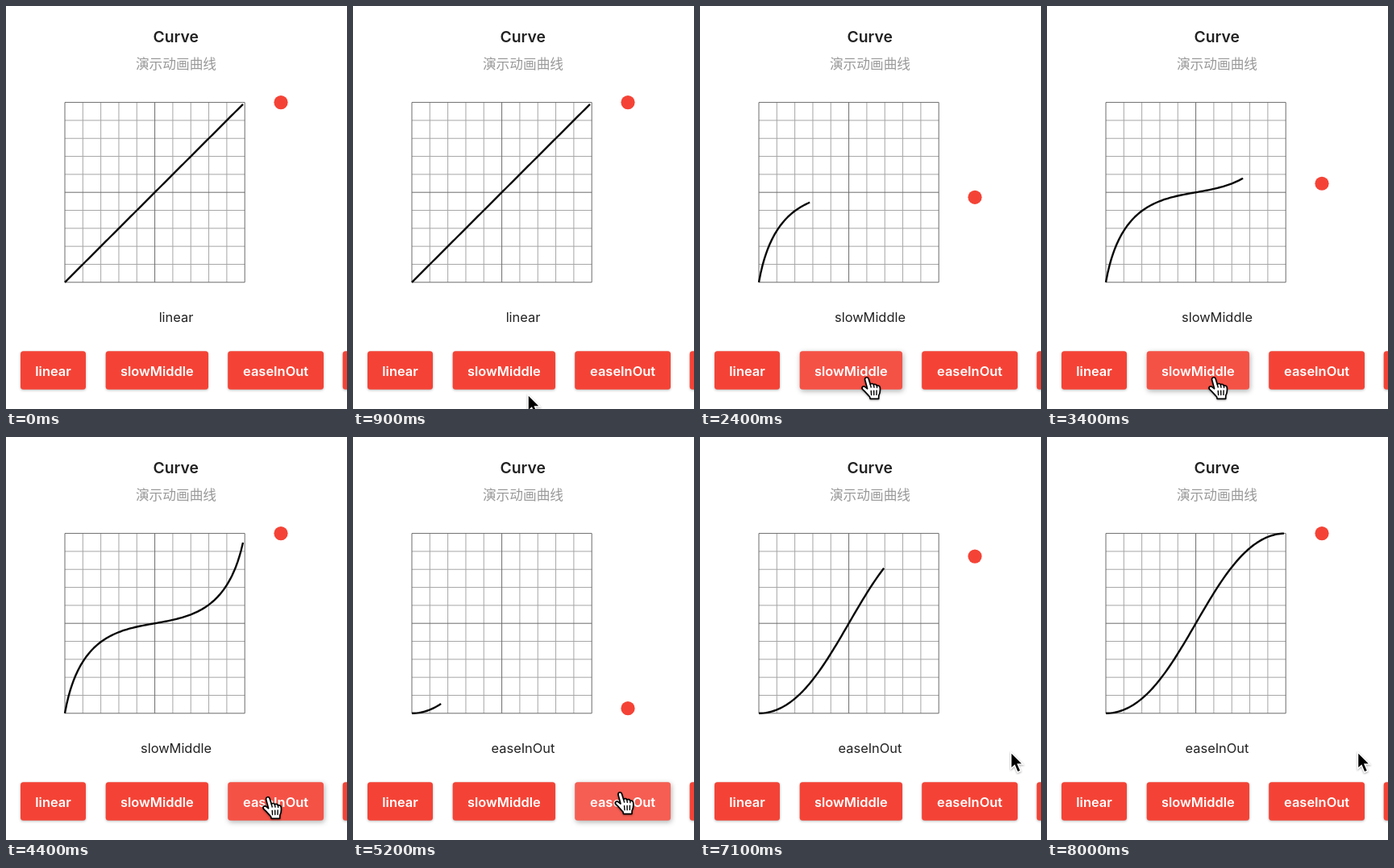
Write an HTML page that moves like this. It is 423 px wide and 500 px high and loops after 8100 ms.

```html
<!DOCTYPE html>
<html lang="zh">
<head>
<meta charset="utf-8">
<title>Curve</title>
<style>
  html, body { margin: 0; width: 100%; height: 100%; overflow: hidden; background: #fff; }
  svg { display: block; }
  text { font-family: Inter, Roboto, sans-serif; text-anchor: middle; fill: #222; }
  .title { font-size: 19.3px; font-weight: 600; }
  .subtitle { font-family: "Noto Sans CJK SC", "Noto Sans CJK", sans-serif; font-size: 16.7px; fill: #999; }
  .label { font-size: 16.4px; }
  .button text { font-size: 16.4px; font-weight: 600; fill: #fff; }
  .button .face { fill: #f44336; filter: drop-shadow(0 1.5px 1.5px rgba(0, 0, 0, .28)); }
  .button.hover .face { filter: drop-shadow(1px 2px 3px rgba(0, 0, 0, .32)); }
  .button .glow { fill: #fff; opacity: 0; }
  .button.hover .glow { opacity: .08; }
  .cursor { filter: drop-shadow(0 1px 1px rgba(0, 0, 0, .35)); }
</style>
</head>
<body>
<svg id="stage" width="423" height="500" viewBox="0 0 423 500">
  <text class="title" x="210.7" y="44.6">Curve</text>
  <text class="subtitle" x="211" y="77.6">演示动画曲线</text>
  <g id="grid" fill="none"></g>
  <path id="curve" fill="none" stroke="#080808" stroke-width="2.4" stroke-linejoin="round"/>
  <circle id="ball" cx="341" r="8.6" fill="#f44336"/>
  <text id="label" class="label" x="211" y="392.4"></text>
  <g id="buttons"></g>
  <g id="arrow" class="cursor">
    <path d="M0 0V20.5L4.6 16.4L8.2 25L12.2 23.3L8.6 15H15Z" fill="#000" stroke="#fff" stroke-width="1.5"/>
  </g>
  <g id="hand" class="cursor" stroke="#000" stroke-width="1.7" stroke-linejoin="round" stroke-linecap="round">
    <path fill="#fff" d="M-2.4 2.6C-2.8-.8 1.3-1.3 2.2 1.8L4.3 8.6C5.2 7 7.8 7.2 8.4 9C9.7 7.8 12 8.4 12.4 10.2C14 9.4 16.2 10.4 16.3 12.6C16.8 17 16.4 19.4 14.8 22.2L14.6 26.4H4.2L3.6 24C.6 20.8-1.4 18-5 14.8C-7.4 12.4-4.8 9.8-2.2 11.6L.6 13.8Z"/>
    <path fill="none" stroke-width="1.4" d="M5.2 16.4L5.6 21.6M8.7 16.2L8.8 21.6M12.1 16L12 21.4M4.3 8.6L5.2 12M8.4 9L9 12.2M12.4 10.2L12.6 12.6"/>
  </g>
</svg>
<script>
const LOOP = 8100, STEP = 100, DURATION = 3000;
const LEFT = 73, TOP = 119.6, SIZE = 223.2, BOTTOM = TOP + SIZE;
const $ = id => document.getElementById(id);

function make(tag, attrs, parent, text = '') {
  const node = document.createElementNS('http://www.w3.org/2000/svg', tag);
  for (const key in attrs) node.setAttribute(key, attrs[key]);
  node.textContent = text;
  return parent.appendChild(node);
}

// Eased value of cubic-bezier(x1, y1, x2, y2) at t.
function cubic(x1, y1, x2, y2) {
  const at = (a, b, s) => 3 * (1 - s) ** 2 * s * a + 3 * (1 - s) * s * s * b + s ** 3;
  return t => {
    let low = 0, high = 1;
    for (let i = 0; i < 30; i++) {
      const mid = (low + high) / 2;
      if (at(x1, x2, mid) < t) low = mid; else high = mid;
    }
    return at(y1, y2, (low + high) / 2);
  };
}

const runs = [
  { name: 'linear', start: -DURATION, ease: t => t },
  { name: 'slowMiddle', start: 1298, ease: cubic(.15, .85, .85, .15) },
  { name: 'easeInOut', start: 4846, ease: cubic(.42, 0, .58, 1) }
];

for (const run of runs) {
  const points = Array.from({ length: 100 }, (_, i) =>
    `${(LEFT + SIZE * i / 100).toFixed(2)} ${(BOTTOM - SIZE * run.ease(i / 100)).toFixed(2)}`);
  run.path = 'M' + points.join('L');
}

for (const strong of [false, true]) {
  for (let i = 0; i <= 10; i++) {
    if ((i % 5 === 0) !== strong) continue;
    const offset = SIZE * i / 10;
    make('path', {
      d: `M${LEFT + offset} ${TOP}v${SIZE}M${LEFT} ${TOP + offset}h${SIZE}`,
      stroke: strong ? '#6c6c6c' : '#a6a6a6', 'stroke-width': 1
    }, $('grid'));
  }
}

const buttons = [[18, 81, 'linear'], [123.7, 127.3, 'slowMiddle'], [275.2, 118.8, 'easeInOut'], [417.7, 100, '']]
  .map(([x, width, name], i) => {
    const group = make('g', { class: 'button' }, $('buttons'));
    const box = { x, y: 428.2, width, height: 47.6, rx: 3.5 };
    make('rect', { ...box, class: 'face' }, group);
    make('rect', { ...box, class: 'glow' }, group);
    make('rect', box, make('clipPath', { id: 'clip' + i }, group));
    const splash = make('circle', { fill: '#fff', 'clip-path': `url(#clip${i})`, opacity: 0 }, group);
    make('text', { x: x + width / 2, y: 458.7 }, group, name);
    return { x, width, name, group, splash };
  });

// Pointer hotspot: time, x, y
const pointerKeys = [
  [700, 226, 503], [1100, 208, 461], [1600, 208, 461], [1900, 207, 461],
  [3700, 207, 461], [4200, 325, 447], [5100, 325, 447], [5600, 386, 391], [LOOP, 385.5, 391]
];

function pointerAt(time) {
  const next = pointerKeys.findIndex(key => key[0] > time);
  if (next < 1) return null;
  const [t0, x0, y0] = pointerKeys[next - 1], [t1, x1, y1] = pointerKeys[next];
  const u = (time - t0) / (t1 - t0), k = u * u * (3 - 2 * u);
  return { x: x0 + (x1 - x0) * k, y: y0 + (y1 - y0) * k };
}

const clamp = v => Math.max(0, Math.min(1, v));

function drawButton(button, time, pointer) {
  const hover = !!pointer && pointer.y > 428 && pointer.y < 476 &&
    pointer.x > button.x && pointer.x < button.x + button.width;
  button.group.classList.toggle('hover', hover);

  const run = runs.find(r => r.name === button.name);
  const age = run ? time - run.start + 100 : -1;
  const active = age >= 0 && age < 700;
  button.splash.setAttribute('opacity', active ? .1 * clamp((700 - age) / 350) : 0);
  if (active) {
    const press = pointerAt(run.start);
    button.splash.setAttribute('cx', press.x);
    button.splash.setAttribute('cy', press.y);
    button.splash.setAttribute('r', 10 + 110 * clamp(age / 300));
  }
  return hover;
}

function drawPointer(id, pointer, visible) {
  $(id).setAttribute('visibility', visible ? 'visible' : 'hidden');
  if (visible) $(id).setAttribute('transform', `translate(${pointer.x} ${pointer.y})`);
}

function draw(time) {
  const run = runs.filter(r => r.start <= time).pop();
  const progress = clamp((time - run.start) / DURATION);
  const curve = $('curve');
  curve.setAttribute('d', run.path);
  curve.setAttribute('stroke-dasharray', `${curve.getTotalLength() * progress} 2000`);
  $('ball').setAttribute('cy', BOTTOM - SIZE * run.ease(progress));
  $('label').textContent = run.name;

  const pointer = pointerAt(time);
  const hovering = buttons.map(b => drawButton(b, time, pointer)).includes(true);
  drawPointer('hand', pointer, pointer && hovering);
  drawPointer('arrow', pointer, pointer && !hovering);
}

const origin = performance.now();
function tick() {
  const elapsed = (performance.now() - origin) % LOOP;
  draw(Math.floor(elapsed / STEP) * STEP);
  requestAnimationFrame(tick);
}
tick();
</script>
</body>
</html>
```
